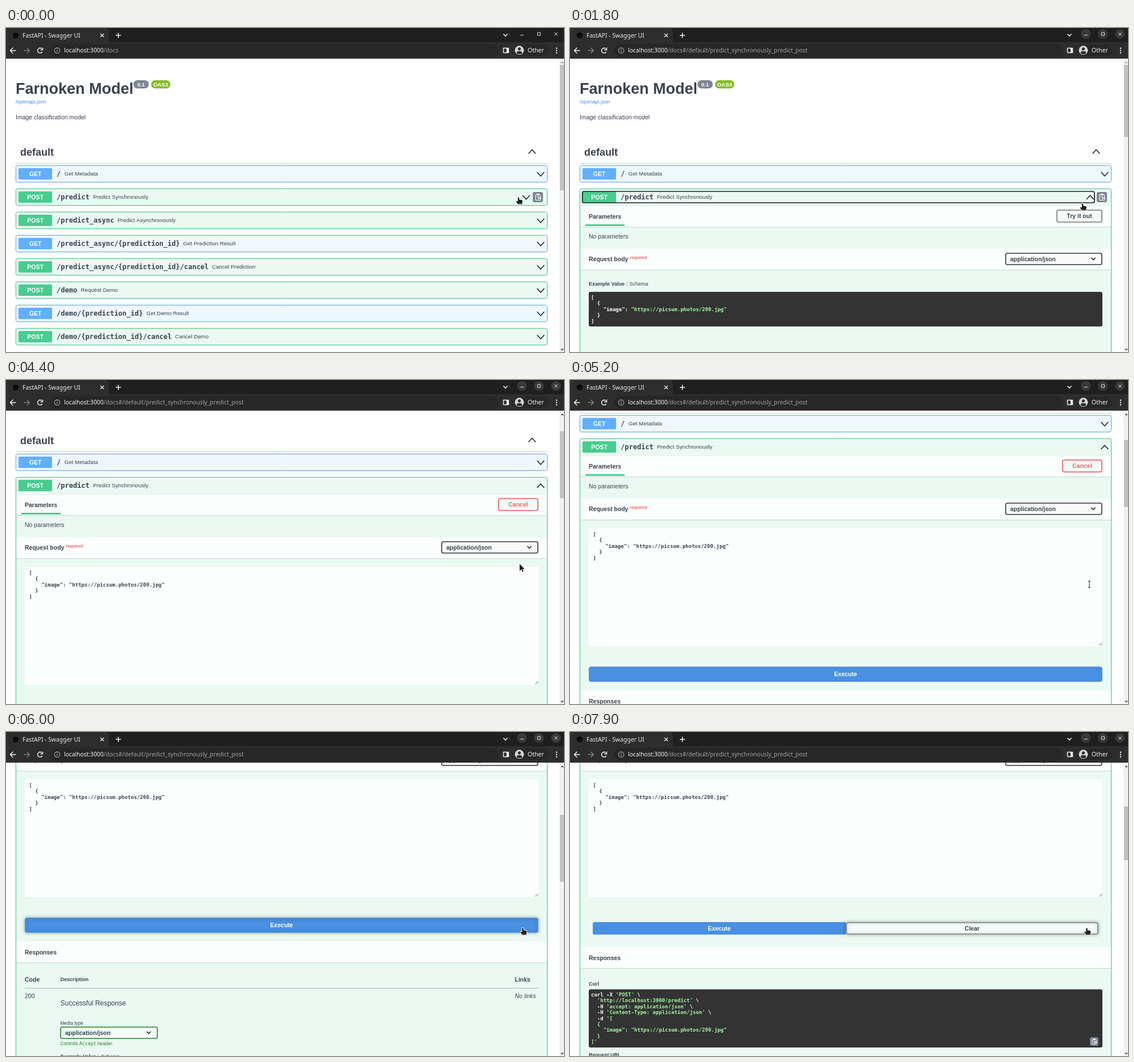
Animation, 981 px wide and 571 px high, one loop 8000 ms. Source, as an HTML page with a canvas:

```html
<!DOCTYPE html>
<html lang="en">
<head>
<meta charset="utf-8">
<title>API docs walkthrough</title>
<style>
html, body { margin: 0; width: 100%; height: 100%; overflow: hidden; background: #fff; }
canvas { display: block; width: 981px; height: 571px; }
</style>
</head>
<body>
<canvas id="stage" width="981" height="571"></canvas>
<script>
const ctx = document.getElementById('stage').getContext('2d');
const LOOP = 8000, STEP = 100, VIEW_TOP = 54;
const SANS = '"Liberation Sans", Arial, sans-serif';
const MONO = '"DejaVu Sans Mono", monospace';
const UI = '"Noto Sans", sans-serif';
const INK = '#3b4151', BLUE = '#61affe', GREEN = '#49cc90', RED = '#f4605c';
const BUTTON = '#4990e2', STRING = '#a2fca2', GREY = '#7d8492';

// Keyframes: [time, value...]
const SCROLL = [[4100, 0], [4200, 20], [4300, 90], [4400, 112], [4500, 150], [4600, 180],
  [5200, 180], [5300, 215], [5400, 310], [5500, 358]];
const POINTER = [[1700, 901, 298], [1800, 901, 309], [2400, 903, 324], [4800, 903, 324],
  [5200, 913, 360], [5600, 913, 360], [6000, 908.5, 345]];
const SHAPES = [[0, 'hand'], [4300, 'arrow'], [4500, 'beam'], [5400, 'arrow'],
  [5800, 'hand'], [7100, 'blocked'], [7800, 'hand']];

const ROUTES = [
  ['GET', '/', 'Get Metadata'],
  ['POST', '/predict', 'Predict Synchronously'],
  ['POST', '/predict_async', 'Predict Asynchronously'],
  ['GET', '/predict_async/{prediction_id}', 'Get Prediction Result'],
  ['POST', '/predict_async/{prediction_id}/cancel', 'Cancel Prediction'],
  ['POST', '/demo', 'Request Demo'],
  ['GET', '/demo/{prediction_id}', 'Get Demo Result'],
  ['POST', '/demo/{prediction_id}/cancel', 'Cancel Demo']
];
// Backticks switch between the base colour and the string colour.
const BODY = ['[', '  {', '    "image": `"https://picsum.photos/200.jpg"', '  }', ']'];
const CURL = ["curl -X `'POST'` \\", "  `'http://localhost:3000/predict'` \\",
  "  -H `'accept: application/json'` \\", "  -H `'Content-Type: application/json'` \\",
  "  -d `'[", '`  {', '`    "image": "https://picsum.photos/200.jpg"', '`  }', "`]'"];

const clamp = v => Math.max(0, Math.min(1, v));
const ramp = (t, from, to) => clamp((t - from) / (to - from));

function track(keys, t) {
  const next = keys.findIndex(k => k[0] > t);
  if (next === 0) return keys[0].slice(1);
  if (next < 0) return keys[keys.length - 1].slice(1);
  const a = keys[next - 1], b = keys[next], p = ramp(t, a[0], b[0]);
  return a.slice(1).map((v, i) => v + (b[i + 1] - v) * p);
}

function text(str, x, y, size, { color = INK, weight = '', font = SANS, align = 'left' } = {}) {
  ctx.font = `${weight} ${size}px ${font}`;
  ctx.fillStyle = color;
  ctx.textAlign = align;
  ctx.fillText(str, x, y);
}
const bold = (str, x, y, size = 10.5, color = INK, align = 'left') =>
  text(str, x, y, size, { weight: 'bold', color, align });

function box(x, y, w, h, r, fill, stroke, width = 1) {
  ctx.beginPath();
  ctx.roundRect(x, y, w, h, r);
  if (fill) { ctx.fillStyle = fill; ctx.fill(); }
  if (stroke) { ctx.strokeStyle = stroke; ctx.lineWidth = width; ctx.stroke(); }
}
function rect(x, y, w, h, fill) { ctx.fillStyle = fill; ctx.fillRect(x, y, w, h); }

function line(points, color, width = 1) {
  ctx.beginPath();
  points.forEach(([x, y]) => ctx.lineTo(x, y));
  ctx.strokeStyle = color;
  ctx.lineWidth = width;
  ctx.stroke();
}
function circle(x, y, r, fill, stroke, width = 1) {
  ctx.beginPath();
  ctx.arc(x, y, r, 0, 7);
  if (fill) { ctx.fillStyle = fill; ctx.fill(); }
  if (stroke) { ctx.strokeStyle = stroke; ctx.lineWidth = width; ctx.stroke(); }
}
// half: half width; dir 1 points down, -1 points up
function chevron(x, y, half, dir, color = '#111', width = 1.4) {
  const d = half * 0.55 * dir;
  line([[x - half, y - d], [x, y + d], [x + half, y - d]], color, width);
}
function shadowed(alpha, blur, paint) {
  ctx.save();
  ctx.shadowColor = `rgba(0,0,0,${alpha})`;
  ctx.shadowBlur = blur;
  paint();
  ctx.restore();
}

function codeLines(lines, x, y, base, accent) {
  lines.forEach((row, i) => {
    let pen = x;
    row.split('`').forEach((part, j) => {
      text(part, pen, y + i * 10.4, 9, { weight: 'bold', font: MONO, color: j % 2 ? accent : base });
      pen += ctx.measureText(part).width;
    });
  });
}

function clipboard(x, y, size) {
  box(x, y, size, size, 3, GREY);
  const s = size / 18;
  ctx.save();
  ctx.translate(x, y);
  ctx.scale(s, s);
  box(5, 4.5, 8.5, 10, 1, null, '#fff', 1.1);
  rect(7, 3, 4.5, 3, '#fff');
  line([[7, 8.5], [11, 8.5]], '#fff', 1);
  line([[15.5, 11], [9, 11]], '#fff', 1.2);
  line([[11, 9], [9, 11], [11, 13]], '#fff', 1);
  ctx.restore();
}

function route([method, path, note], y, open, hovered) {
  const color = method === 'GET' ? BLUE : GREEN;
  const tint = method === 'GET' ? '#eff7ff' : '#ebf9f3';
  const height = open ? 1200 : 29;
  shadowed(0.25, 3, () => box(17.5, y + 0.5, 934, height, 3, '#fff'));
  box(17.5, y + 0.5, 934, height, 3, tint, color);
  box(22, y + 5, 59, 20, 2, color);
  bold(method, 51.5, y + 18.7, 10.5, '#fff', 'center');
  text(path, 89, y + 19, 12, { weight: 'bold', font: MONO });
  text(note, 89 + path.length * 7.2 + 6.5, y + 18, 9.75);
  if (open) rect(18, y + 30, 933, 1, color);
  chevron(hovered ? 914.5 : 940, y + 15.5, 6.3, open ? -1 : 1);
  if (hovered) clipboard(926, y + 6, 18);
}

function sectionHeader(y, height) {
  rect(18, y, 933, height, 'rgba(255,255,255,.82)');
  rect(18, y + height, 933, 1, 'rgba(0,0,0,.11)');
  rect(18, y + height + 1, 933, 1, 'rgba(0,0,0,.03)');
}

function select(x, y, w, border) {
  box(x + 1, y + 1, w - 2, 20, 3, '#f9faf9', border, 1.6);
  bold('application/json', x + 9, y + 14.5);
  chevron(x + w - 16, y + 10.7, 3.5, 1, '#222', 1.5);
}

function exampleTabs(x, y) {
  bold('Example Value', x, y, 9);
  rect(x + 66.5, y - 8, 1, 10, 'rgba(59,65,81,.35)');
  text('Schema', x + 71.5, y, 9);
}

function button(x, y, w, h, label, color, hover, fill) {
  shadowed(0.12 + 0.2 * hover, 2 + 4 * hover, () => box(x + 1, y + 1, w - 2, h - 2, 3, fill || '#f6fcf9', color, 1.6));
  bold(label, x + w / 2, y + h / 2 + 3.8, 10.5, fill ? '#fff' : color === '#808080' ? INK : color, 'center');
}

function responses(y) {
  sectionHeader(y, 37);
  bold('Responses', 33, y + 22.5);
}

function responseTable(y) {
  bold('Code', 33, y + 71);
  bold('Description', 95.5, y + 70, 9);
  bold('Links', 894.5, y + 71);
  rect(33, y + 82, 903, 1, 'rgba(59,65,81,.35)');
  text('200', 33, y + 100, 10.5);
  text('No links', 894.5, y + 100, 10.5, { weight: 'italic' });
  text('Successful Response', 95.5, y + 112.7, 12);
  text('Media type', 95.5, y + 147, 8.25);
  select(95, y + 150, 172, '#178a17');
  const green = '#178a17';
  text('Controls', 95.5, y + 183, 8.25, { color: green });
  text('Accept', 129, y + 183, 8.25, { color: green, font: MONO });
  text('header.', 161, y + 183, 8.25, { color: green });
  exampleTabs(95.5, y + 205.5);
}

function spinner(t, y) {
  ctx.save();
  ctx.globalAlpha = ramp(t, 7000, 7500);
  circle(486, y, 23, null, 'rgba(85,85,85,.12)', 2);
  const mid = -Math.PI / 2 + (t - 7070) / 1000 * Math.PI * 2;
  ctx.beginPath();
  ctx.arc(486, y, 23, mid - Math.PI / 4, mid + Math.PI / 4);
  ctx.strokeStyle = 'rgba(0,0,0,.6)';
  ctx.lineWidth = 1.7;
  ctx.stroke();
  bold('LOADING', 484.5, y + 2, 7.1, INK, 'center');
  ctx.restore();
}

function editor(t) {
  rect(33, 441, 903, 208, 'rgba(255,255,255,.85)');
  codeLines(BODY.map(s => s.replace('`', '')), 40.5, 455, INK);
  line([[930, 648], [935.5, 642.5]], '#777', 1);
  line([[933, 648], [935.5, 645.5]], '#777', 1);

  if (t >= 7800) {
    box(40, 693, 445, 22, [3, 0, 0, 3], BUTTON);
    bold('Execute', 262.5, 707.7, 10.5, '#fff', 'center');
    button(485, 693, 444, 22, 'Clear', '#808080', 1);
    responses(737);
    bold('Curl', 33, 805, 9);
    box(33, 811.5, 903, 102.5, 3, '#333');
    codeLines(CURL, 37, 824, '#fff', STRING);
    clipboard(914, 896, 15);
    bold('Request URL', 33, 930, 9);
    return;
  }
  const loading = t >= 7100;
  ctx.save();
  ctx.globalAlpha = 1 - 0.7 * ramp(t, 7000, 7300);
  button(33, 685, 903, 27, 'Execute', BUTTON, ramp(t, 5700, 6000), BUTTON);
  ctx.restore();
  if (loading) spinner(t, 770);
  const y = loading ? 813.5 : 727;
  responses(y);
  responseTable(y);
}

function operation(t) {
  const editing = t >= 2700;
  sectionHeader(313, 37);
  bold('Parameters', 33, 335.7);
  rect(27, 346, 69, 3, GREEN);
  if (editing) button(865, 320, 71, 23, 'Cancel', RED, t < 4300 ? 1 : 0);
  else button(855, 320, 81, 23, 'Try it out', '#808080', ramp(t, 2100, 2400));
  text('No parameters', 33, 371, 10.5);
  sectionHeader(389, 37);
  bold('Request body', 33, 411);
  bold('required', 105.5, 406.5, 7.5, RED);
  select(765, 396, 171, '#30333b');

  if (editing) return editor(t);
  exampleTabs(33, 454);
  box(33, 465, 903, 61, 3, '#333');
  codeLines(BODY, 37, 478, '#fff', STRING);
}

function page(t) {
  const open = t >= 500, hovered = t < 1900;
  bold('Farnoken Model', 17, 116, 27);
  box(224, 92, 27, 14.5, 7.2, GREY);
  bold('0.1', 237.5, 102.7, 9.75, '#fff', 'center');
  box(255, 92, 34, 14.5, 7.2, '#86bd27');
  bold('OAS3', 272, 102.7, 9.75, '#fff', 'center');
  text('/openapi.json', 17, 133, 9, { color: BUTTON });
  text('Image classification model', 17, 161, 10.5);
  bold('default', 25, 225, 18);
  chevron(925, 218, 6.3, -1);
  rect(17, 238, 935, 1, 'rgba(59,65,81,.25)');

  const shown = open ? ROUTES.slice(0, 2) : ROUTES;
  shown.forEach((r, i) => route(r, 242 + 41 * i, open && i === 1, hovered && i === 1));
  if (!open) return;
  if (t < 2700) box(21.7, 288, hovered ? 900.3 : 925.3, 20, 3, null, '#1c1f22', 1.7);
  operation(t);
}

function scrollbar(t, scroll) {
  rect(973, VIEW_TOP, 8, 517, '#f1f1f1');
  let top = 65 + 81 * scroll / 358, size = 118;
  if (t < 500) size = 221;
  else if (t < 2700) size = 127;
  else if (t >= 7800) { top = 131; size = 95; }
  else if (t >= 7100) { top = 143; size = 113; }
  rect(974, top, 7, size, '#c1c1c1');
  const arrow = (y, d, color) => {
    ctx.beginPath();
    ctx.moveTo(975, y);
    ctx.lineTo(981, y);
    ctx.lineTo(978, y + d);
    ctx.fillStyle = color;
    ctx.fill();
  };
  arrow(62, -3, scroll ? '#505050' : '#a3a3a3');
  arrow(565.5, 3, '#505050');
}

function browser(t) {
  const white = '#f2f2f2';
  rect(0, 0, 981, 26, '#1f1f1f');
  box(-6, 0, 187, 32, [7, 7, 0, 0], '#2d2d2d');
  rect(0, 25, 981, 29, '#2d2d2d');
  box(78, 28, 787, 24, 12, '#272727');
  circle(17, 13, 5.2, '#0b0b0b');
  text('FastAPI - Swagger UI', 29, 16.7, 10.4, { color: '#e8e8e8', font: UI });
  const cross = (x, y, r, w) => {
    line([[x - r, y - r], [x + r, y + r]], white, w);
    line([[x + r, y - r], [x - r, y + r]], white, w);
  };
  cross(169, 13, 3, 1.3);
  line([[193, 13], [202, 13]], white, 1.5);
  line([[197.5, 8.5], [197.5, 17.5]], white, 1.5);
  chevron(878, 12.5, 3.6, 1, white, 1.5);

  const focus = ramp(t, 400, 700);
  [907, 937, 967].forEach(x => circle(x, 10.5, 8.5, `rgba(255,255,255,${0.12 * focus})`));
  line([[904, 12.5], [910, 12.5]], '#ddd', 1);
  box(934.5, 8, 5, 5, 0, null, '#ddd', 1);
  cross(967, 10.5, 2.8, 1);

  const arrow = (x, d, color) => {
    line([[x - 5 * d, 39.7], [x + 5 * d, 39.7]], color, 1.5);
    line([[x, 34.7], [x - 5 * d, 39.7], [x, 44.7]], color, 1.5);
  };
  arrow(12.5, 1, white);
  arrow(36.5, -1, '#7d7d7d');
  ctx.beginPath();
  ctx.arc(60, 39.7, 4.4, 0.5, 5.5);
  ctx.strokeStyle = white;
  ctx.lineWidth = 1.5;
  ctx.stroke();
  line([[64.5, 34.5], [64.5, 38.5], [60.5, 38.5]], white, 1.5);
  circle(90, 39.7, 4.8, null, '#a5a5a5', 1.1);
  rect(89.5, 39, 1.2, 3.4, '#a5a5a5');
  rect(89.5, 36.8, 1.2, 1.3, '#a5a5a5');

  text('localhost:3000', 102, 43, 10.25, { color: '#f2f2f2', font: UI });
  const host = ctx.measureText('localhost:3000').width;
  const path = t < 500 ? '/docs' : '/docs#/default/predict_synchronously_predict_post';
  text(path, 102 + host, 43, 10.25, { color: '#a0a0a0', font: UI });

  box(874.5, 35.5, 9, 8, 0.5, null, white, 1.4);
  rect(880, 35, 4, 9, white);
  box(893, 30, 60, 19, 9.5, '#272727');
  circle(902.5, 39.3, 8, '#d5d5d5');
  circle(902.5, 36.8, 2.6, '#2d2d2d');
  ctx.beginPath();
  ctx.ellipse(902.5, 43.5, 4.8, 2.7, 0, 0, 7);
  ctx.fillStyle = '#2d2d2d';
  ctx.fill();
  text('Other', 917, 43.2, 10.5, { color: white, font: UI });
  [35.7, 39.7, 43.7].forEach(y => circle(968, y, 1.2, white));
}

function outlined(d) {
  const p = new Path2D(d);
  ctx.strokeStyle = '#fff';
  ctx.lineWidth = 1.8;
  ctx.lineJoin = 'round';
  ctx.stroke(p);
  ctx.fillStyle = '#1e1e1e';
  ctx.fill(p);
}
const CURSORS = {
  hand() {
    outlined('M-1.2 1Q0-.5 1.2 1V4.2L6 5.2Q7.2 5.6 7 7L6.2 12.5H-.8L-4 8.2Q-4.4 6.6-2.6 7L-1.2 8Z');
    line([[0, 11], [5, 11]], '#777', 0.7);
  },
  arrow() { outlined('M0 0V12.5L3 9.8L5 14.4L6.8 13.6L4.9 9.2H8.8Z'); },
  beam() {
    const strokes = (color, w) => {
      line([[0, -5], [0, 5]], color, w);
      [-5.5, 5.5].forEach(y => line([[-2.5, y], [2.5, y]], color, w));
    };
    strokes('#fff', 2.4);
    strokes('#333', 1.1);
  },
  blocked() {
    ctx.translate(-1.3, 2.3);
    circle(0, 0, 6.4, '#fff');
    circle(0, 0, 4.8, '#fff', '#1e1e1e', 2);
    line([[-3.2, 3.2], [3.2, -3.2]], '#1e1e1e', 2);
  }
};

function draw(now) {
  const t = Math.floor((now % LOOP) / STEP) * STEP;
  const [scroll] = track(SCROLL, t);
  rect(0, 0, 981, 571, '#fff');
  ctx.save();
  ctx.beginPath();
  ctx.rect(0, VIEW_TOP, 981, 517);
  ctx.clip();
  ctx.translate(0, -scroll);
  page(t);
  ctx.restore();
  scrollbar(t, scroll);
  browser(t);

  const [x, y] = track(POINTER, t);
  const shape = SHAPES.filter(s => s[0] <= t).pop()[1];
  ctx.save();
  ctx.translate(x, y);
  CURSORS[shape]();
  ctx.restore();
  requestAnimationFrame(draw);
}
requestAnimationFrame(draw);
</script>
</body>
</html>
```
